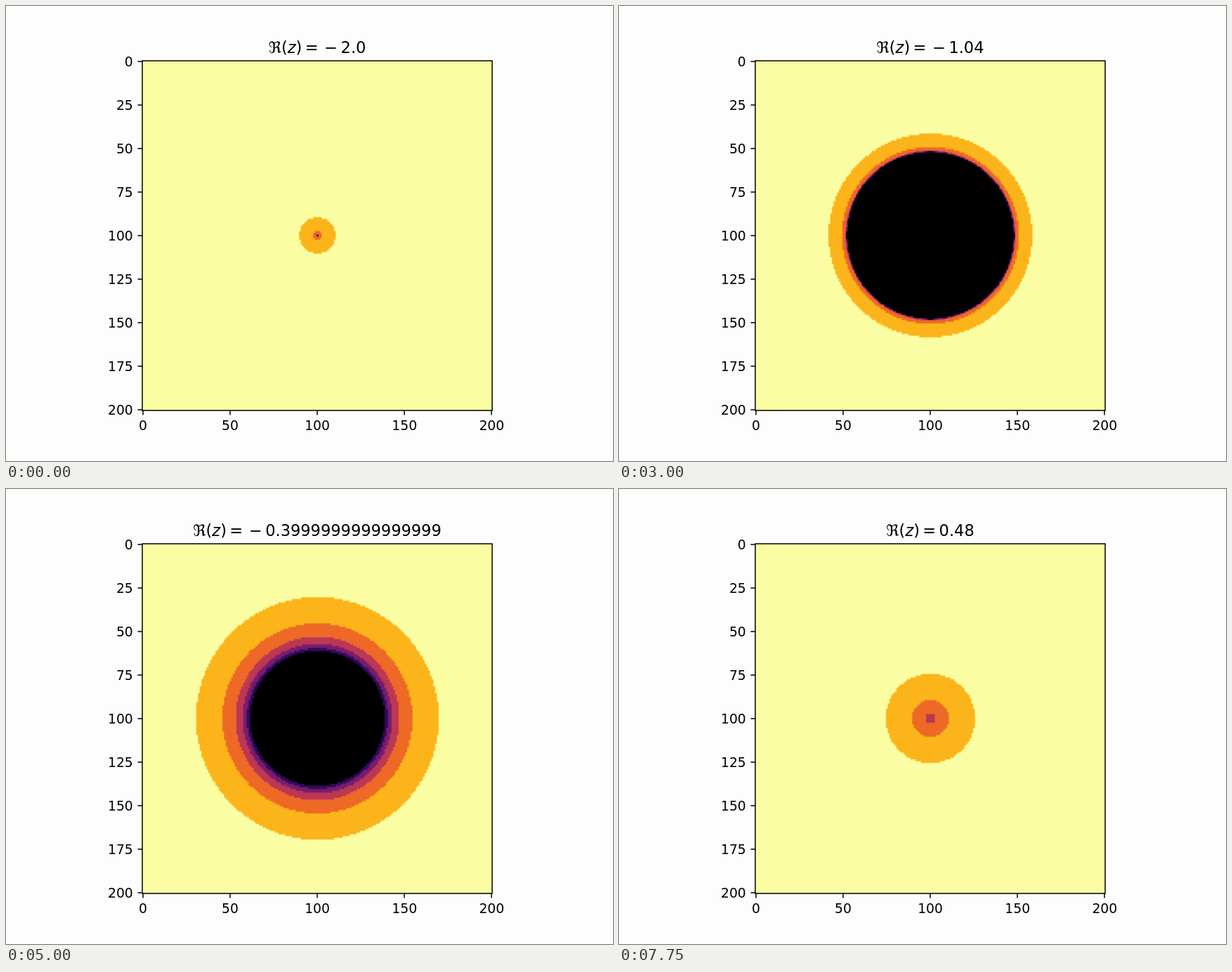
An HTML page with a canvas for the animation above (8 s loop, 864x648 px).

```html
<!DOCTYPE html>
<html lang="en">
<head>
<meta charset="utf-8">
<title>Slices of a split-complex Mandelbrot set</title>
<style>
  html, body { margin: 0; width: 864px; height: 648px; overflow: hidden; background: #fdfdfd; }
  canvas, svg { position: absolute; left: 0; top: 0; display: block; }
  text { font-family: "DejaVu Sans", sans-serif; font-size: 18.75px; fill: #000; white-space: pre; }
  #title { font-size: 22.5px; text-anchor: middle; }
  .line { fill: none; stroke: #000; stroke-width: 1.5; }
</style>
</head>
<body>
<canvas id="plot" width="864" height="648"></canvas>
<svg width="864" height="648" viewBox="0 0 864 648">
  <rect class="line" x="194" y="78" width="498" height="498"/>
  <g id="axes"></g>
  <text id="title" x="443" y="67"></text>
</svg>
<script>
const STEP_MS = 250, STEPS = 32;
const N = 201, MID = 100;
const BOX_X = 194, BOX_Y = 78, SIZE = 498;      // frame in whole pixels
const LEFT = 193.32, TOP = 77.76, CELL = 498.96 / N;  // data coordinates
const SHIFT_X = 0.5, SHIFT_Y = -0.5;            // pixel rounding of the raster
const LIMIT = 12, MAX_ITER = 8, FIRST = 3;
const STOPS = ["000000", "320a5e", "781c6d", "bb3754", "ed6925", "fbb41a", "fafda1"]
  .map(h => [0, 2, 4].map(i => parseInt(h.slice(i, i + 2), 16)));

const ctx = document.getElementById("plot").getContext("2d");
const title = document.getElementById("title");
const image = ctx.createImageData(SIZE, SIZE);
const pixels = new Uint32Array(image.data.buffer);
const grid = new Float32Array(N * N);
const rows = new Float32Array(N * SIZE);

// Packed colours for levels 0..6
const palette = Uint32Array.from({ length: 601 }, (_, i) => {
  const k = Math.min(5, Math.floor(i / 100)), t = i / 100 - k;
  const [r, g, b] = STOPS[k].map((c, j) => Math.round(c + (STOPS[k + 1][j] - c) * t));
  return (255 << 24 | b << 16 | g << 8 | r) >>> 0;
});

// Neighbouring cells and Hann weight for each screen pixel
function samples(start, edge) {
  return Array.from({ length: SIZE }, (_, p) => {
    const s = Math.max(0, Math.min(N - 1, (start + p + 0.5 - edge) / CELL - 0.5));
    const a = Math.floor(s);
    return { a, b: Math.min(N - 1, a + 1), w: 0.5 - 0.5 * Math.cos(Math.PI * (s - a)) };
  });
}
const across = samples(BOX_X, LEFT + SHIFT_X), down = samples(BOX_Y, TOP + SHIFT_Y);

// The square splits into two real maps, on re + r and re - r
function level(re, r) {
  const cu = re + r, cv = re - r;
  let u = cu, v = cv;
  for (let n = 1; n <= MAX_ITER; n++) {
    if ((u * u + v * v) / 2 > LIMIT) return MAX_ITER + 1 - Math.max(n, FIRST);
    u = u * u + cu;
    v = v * v + cv;
  }
  return 0;
}

function drawSlice(re) {
  for (let y = 0; y <= MID; y++) {
    for (let x = 0; x <= MID; x++) {
      const value = level(re, 0.02 * Math.hypot(x - MID, y - MID));
      const fx = N - 1 - x, fy = N - 1 - y;
      grid[y * N + x] = grid[y * N + fx] = grid[fy * N + x] = grid[fy * N + fx] = value;
    }
  }
  for (let y = 0; y < N; y++) {
    for (let p = 0; p < SIZE; p++) {
      const { a, b, w } = across[p], from = grid[y * N + a];
      rows[y * SIZE + p] = from + (grid[y * N + b] - from) * w;
    }
  }
  for (let q = 0; q < SIZE; q++) {
    const { a, b, w } = down[q];
    for (let p = 0; p < SIZE; p++) {
      const from = rows[a * SIZE + p];
      const value = from + (rows[b * SIZE + p] - from) * w;
      pixels[q * SIZE + p] = palette[Math.round(value * 100)];
    }
  }
  ctx.putImageData(image, BOX_X, BOX_Y);
}

function drawTitle(re) {
  const gap = 4.38, size = Math.abs(re);
  const spaced = (text, gaps) => `<tspan dx="${gap * gaps}">${text}</tspan>`;
  const digits = Number.isInteger(size) ? size.toFixed(1) : String(size);
  title.innerHTML = `\u211c(<tspan font-style="italic">z</tspan>)` + spaced("=", 1) +
    (re < 0 ? spaced("\u2212", 2) : "") + spaced(digits, 1);
}

function drawAxes() {
  const bottom = BOX_Y + SIZE;
  let out = "";
  for (let v = 0; v <= 200; v += 25) {
    const pos = (v + 0.5) * CELL;
    const x = LEFT + pos, y = Math.round(TOP + pos);
    out += `<path class="line" d="M${BOX_X} ${y}h-6.6"/>` +
      `<text x="180.8" y="${y + 7}" text-anchor="end">${v}</text>`;
    if (v % 50 === 0) {
      out += `<path class="line" d="M${Math.round(x)} ${bottom}v6.6"/>` +
        `<text x="${x + 0.3}" y="604" text-anchor="middle">${v}</text>`;
    }
  }
  document.getElementById("axes").innerHTML = out;
}

let shown = -1;
function update(now) {
  const step = Math.floor(now / STEP_MS) % STEPS;
  if (step !== shown) {
    shown = step;
    const re = step * 0.08 - 2;
    drawSlice(re);
    drawTitle(re);
  }
}

const start = performance.now();
function tick() {
  update(performance.now() - start);
  requestAnimationFrame(tick);
}
drawAxes();
tick();
</script>
</body>
</html>
```
